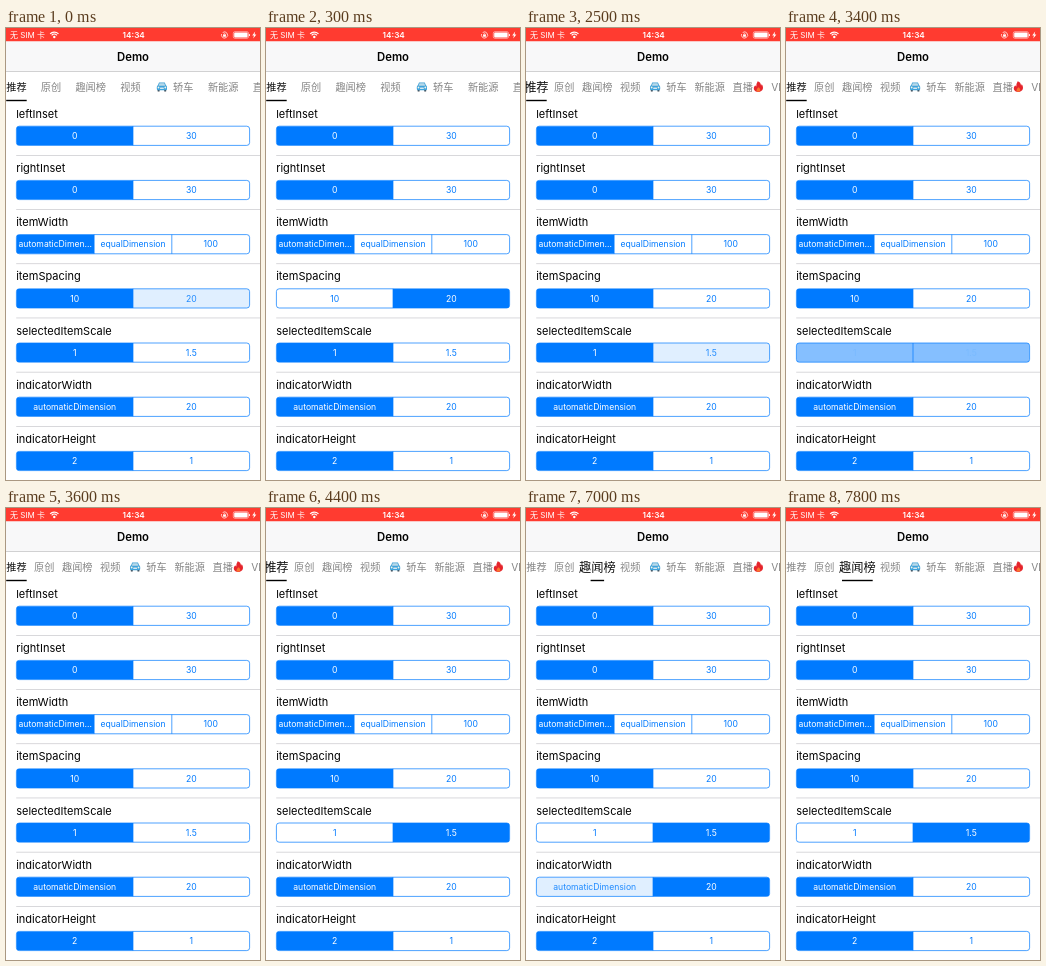
Write an HTML page with a canvas that moves like this. It is 254 px wide and 452 px high and loops after 8000 ms.

```html
<!DOCTYPE html>
<html lang="zh">
<head>
<meta charset="utf-8">
<title>Demo</title>
<style>
html, body { margin: 0; width: 100%; height: 100%; overflow: hidden; background: #fff; }
canvas { display: block; width: 254px; height: 452px; }
</style>
</head>
<body>
<canvas id="stage"></canvas>
<script>
const W = 254, H = 452, LOOP = 8000;
const BLUE = [0, 122, 255], WHITE = [255, 255, 255];
const LATIN = 'Inter, "Liberation Sans", sans-serif';
const CJK = '"Noto Sans CJK SC", "Noto Sans CJK", sans-serif';

const canvas = document.getElementById('stage');
const ctx = canvas.getContext('2d');
const dpr = window.devicePixelRatio || 1;
canvas.width = W * dpr;
canvas.height = H * dpr;

const rows = [
  ['leftInset', '0', '30'],
  ['rightInset', '0', '30'],
  ['itemWidth', 'automaticDimen…', 'equalDimension', '100'],
  ['itemSpacing', '10', '20'],
  ['selectedItemScale', '1', '1.5'],
  ['indicatorWidth', 'automaticDimension', '20'],
  ['indicatorHeight', '2', '1']
];
const SPACING = 3, SCALE = 4, INDICATOR = 5;

const tabs = [
  { text: '推荐', w: 20.5 },
  { text: '原创', w: 20.5 },
  { text: '趣闻榜', w: 30.7 },
  { text: '视频', w: 20.5 },
  { text: '轿车', w: 39, dx: 18.2, icon: drawCar },
  { text: '新能源', w: 30.7 },
  { text: '直播', w: 31.4, icon: drawFlame },
  { text: 'VR', w: 15 }
];

// Fill of the [old, new] cell in each phase of a selection change.
const phases = { A: [1, 0.12], B: [0.48, 0.48], C: [0.12, 1], D: [0, 1] };
const STEP = 100;
const changes = [
  { at: 0, row: SPACING, to: 1, seq: 'AABD' },
  { at: 900, row: SPACING, to: 0, seq: 'BCD' },
  { at: 2500, row: SCALE, to: 1, seq: 'ABD' },
  { at: 3400, row: SCALE, to: 0, seq: 'BCD' },
  { at: 4200, row: SCALE, to: 1, seq: 'BCD' },
  { at: 7000, row: INDICATOR, to: 1, seq: 'CCD' },
  { at: 7700, row: INDICATOR, to: 0, seq: 'BD' }
];
const TAB_TAP = 5400;

function stateAt(t) {
  const value = rows.map(() => 0);
  const fills = rows.map(r => r.slice(1).map((_, i) => i ? 0 : 1));
  for (const c of changes) {
    if (t < c.at) continue;
    const i = Math.min(Math.floor((t - c.at) / STEP), c.seq.length - 1);
    const [was, now] = phases[c.seq[i]];
    fills[c.row][1 - c.to] = was;
    fills[c.row][c.to] = now;
    value[c.row] = c.to;
  }
  return { value, fills, tab: t < TAB_TAP ? 0 : 2 };
}

const mix = (a, b, p) => `rgb(${a.map((v, i) => Math.round(v + (b[i] - v) * p))})`;

function rect(x, y, w, h, color) {
  ctx.fillStyle = color;
  ctx.fillRect(x, y, w, h);
}

function text(str, x, y, font, color, align = 'left') {
  ctx.font = font;
  ctx.fillStyle = color;
  ctx.textAlign = align;
  ctx.fillText(str, x, y);
}

function roundPath(x, y, w, h, r) {
  ctx.beginPath();
  ctx.roundRect(x, y, w, h, r);
}

function pill(x, y, w, h, r, color) {
  roundPath(x, y, w, h, r);
  ctx.fillStyle = color;
  ctx.fill();
}

function dot(x, y, r, color) {
  ctx.beginPath();
  ctx.arc(x, y, r, 0, Math.PI * 2);
  ctx.fillStyle = color;
  ctx.fill();
}

function poly(points, color) {
  ctx.beginPath();
  points.forEach(([x, y]) => ctx.lineTo(x, y));
  ctx.closePath();
  ctx.fillStyle = color;
  ctx.fill();
}

function drawCar(x) {
  const l = x + 2;
  pill(l + 0.8, 61, 2, 2.6, 0.6, '#3d4650');
  pill(l + 7.4, 61, 2, 2.6, 0.6, '#3d4650');
  poly([[l + 2.2, 54.4], [l + 8, 54.4], [l + 9.5, 58.2], [l + 0.7, 58.2]], '#419fd4');
  pill(l, 57.5, 10.2, 4.8, 1.4, '#3fa3dc');
  poly([[l + 2.7, 55.2], [l + 7.5, 55.2], [l + 8.4, 57.8], [l + 1.8, 57.8]], '#b9d9e8');
  dot(l + 1.7, 59.5, 0.9, '#f2f4e6');
  dot(l + 8.5, 59.5, 0.9, '#f2f4e6');
  pill(l + 3.2, 59.6, 3.8, 1.5, 0.5, '#d7e8f0');
}

function drawFlame(x) {
  const c = x + 25.8;
  ctx.beginPath();
  ctx.moveTo(c - 0.6, 53.2);
  ctx.bezierCurveTo(c + 2.6, 54.4, c + 2.4, 56.4, c + 2.8, 57.6);
  ctx.quadraticCurveTo(c + 3.4, 57, c + 3.3, 56);
  ctx.bezierCurveTo(c + 6, 59.4, c + 4.8, 63.8, c, 63.9);
  ctx.bezierCurveTo(c - 5, 63.8, c - 5.6, 59.4, c - 3, 57.2);
  ctx.quadraticCurveTo(c - 2.8, 58, c - 2, 58.4);
  ctx.quadraticCurveTo(c - 2, 55.4, c - 0.6, 53.2);
  ctx.fillStyle = '#e5242b';
  ctx.fill();
  ctx.beginPath();
  ctx.moveTo(c + 0.2, 59.2);
  ctx.bezierCurveTo(c + 3.2, 61.4, c + 2, 63.7, c, 63.7);
  ctx.bezierCurveTo(c - 2.4, 63.7, c - 2.4, 61.4, c + 0.2, 59.2);
  ctx.fillStyle = '#f9742f';
  ctx.fill();
}

function drawStatus() {
  rect(0, 0, W, 13.5, '#ff3b30');
  text('无 SIM 卡', 4, 9.9, `8px Inter, ${CJK}`, '#fff');
  text('14:34', 127.7, 9.8, `600 8.2px ${LATIN}`, '#fff', 'center');

  // Wi-Fi
  ctx.strokeStyle = '#fff';
  ctx.lineWidth = 1.2;
  for (const r of [3.6, 5.7]) {
    ctx.beginPath();
    ctx.arc(48.3, 9.8, r, -Math.PI * 0.76, -Math.PI * 0.24);
    ctx.stroke();
  }
  dot(48.3, 9, 1.2, '#fff');

  // Rotation lock
  ctx.lineWidth = 0.7;
  ctx.beginPath();
  ctx.arc(218.5, 7, 3.1, -Math.PI * 0.7, Math.PI * 1.1);
  ctx.stroke();
  pill(217.1, 6.6, 2.8, 2.1, 0.3, '#fff');
  ctx.beginPath();
  ctx.arc(218.5, 6.6, 0.9, Math.PI, 0);
  ctx.stroke();

  // Battery and bolt
  roundPath(227.3, 3.7, 15.2, 6.6, 1.6);
  ctx.lineWidth = 0.5;
  ctx.stroke();
  pill(228.2, 4.6, 13.4, 4.8, 0.9, '#fff');
  pill(243.1, 5.9, 0.9, 2.2, 0.4, '#fff');
  poly([[249.2, 3.5], [246.2, 7.5], [248, 7.5], [247.2, 10.5], [250.4, 6.4], [248.5, 6.4]], '#fff');
}

function drawNav() {
  rect(0, 13.5, W, 30, '#f8f8f9');
  rect(0, 43.1, W, 0.6, '#b5b5b8');
  text('Demo', 127, 32.7, `600 11.3px ${LATIN}`, '#000', 'center');
}

function drawTabs({ value, tab }) {
  const gap = value[SPACING] ? 14.1 : 7.4;
  let x = 0.2;
  tabs.forEach((item, i) => {
    const on = i === tab;
    const cx = x + item.w / 2;
    ctx.save();
    if (on && value[SCALE]) {
      ctx.translate(cx, 59);
      ctx.scale(1.2, 1.2);
      ctx.translate(-cx, -59);
    }
    const font = `10.2px ${item.text === 'VR' ? LATIN : CJK}`;
    text(item.text, x + (item.dx || 0), 62.8, font, on ? '#111' : '#858585');
    ctx.restore();
    if (item.icon) item.icon(x);
    if (on) {
      const w = value[INDICATOR] ? 13.5 : item.w;
      rect(cx - w / 2, 71.8, w, 1.4, '#000');
    }
    x += item.w + gap;
  });
}

function drawSegments(labels, fills, y) {
  const x = 10.4, w = 233.2, h = 19.2;
  const cell = w / labels.length;
  ctx.save();
  roundPath(x, y, w, h, 2.8);
  ctx.clip();
  fills.forEach((f, i) => rect(x + i * cell, y, cell, h, mix(WHITE, BLUE, f)));
  ctx.restore();
  ctx.strokeStyle = mix(WHITE, BLUE, 1);
  ctx.lineWidth = 0.7;
  roundPath(x, y, w, h, 2.8);
  ctx.stroke();
  labels.forEach((label, i) => {
    if (i) rect(x + i * cell - 0.35, y, 0.7, h, mix(WHITE, BLUE, 1));
    text(label, x + (i + 0.5) * cell, y + 12.8, `8.65px ${LATIN}`, mix(BLUE, WHITE, fills[i]), 'center');
  });
}

function drawRows({ fills }) {
  rows.forEach(([title, ...labels], i) => {
    const top = i * 54.2;
    text(title, 10.2, 89.8 + top, `11px ${LATIN}`, '#000');
    drawSegments(labels, fills[i], 98.2 + top);
    if (i < rows.length - 1) rect(10.2, 127 + top, W, 0.7, '#c8c7cc');
  });
}

function draw(t) {
  const state = stateAt(t);
  ctx.setTransform(dpr, 0, 0, dpr, 0, 0);
  rect(0, 0, W, H, '#fff');
  drawStatus();
  drawNav();
  drawTabs(state);
  drawRows(state);
}

let start;
function frame(now) {
  if (start === undefined) start = now;
  draw(Math.max(0, now - start) % LOOP);
  requestAnimationFrame(frame);
}
draw(0);
requestAnimationFrame(frame);
</script>
</body>
</html>
```
